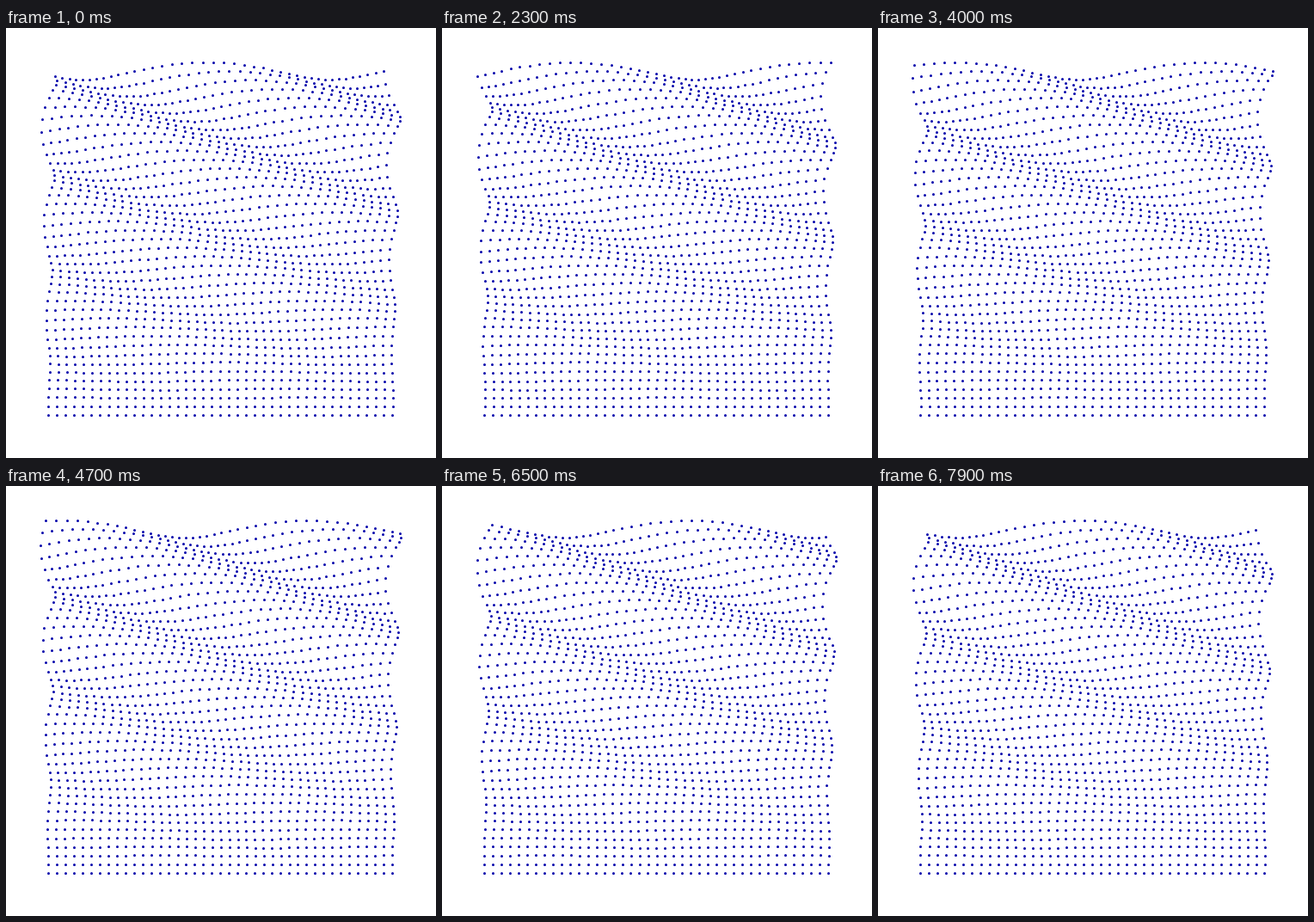
Recreate the animation shown at these times as an HTML page with a canvas. Size 500x500 px, loop 8 s.

```html
<!DOCTYPE html>
<html lang="en">
<head>
<meta charset="utf-8">
<title>Water wave particles</title>
<style>
  html, body { margin: 0; width: 100%; height: 100%; overflow: hidden; background: #fff; }
  canvas { display: block; width: 500px; height: 500px; }
</style>
</head>
<body>
<canvas id="stage" width="500" height="500"></canvas>
<script>
const ctx = document.getElementById('stage').getContext('2d');

const LOOP = 8000, STEP = 100;
const FIRST = 50, LAST = 450, GAP = 10;
const KX = 0.0218, KY = 0.0566;   // wave numbers, radians per pixel
const PHASE = 0.355;              // phase at the middle of the top row
const MAX_RADIUS = 10;
const SHIFT_X = -0.1, SHIFT_Y = 0.35;   // grid offset before snapping to pixels

// Each particle circles its rest point; the circles shrink to nothing at the bottom.
function draw(time) {
  const turn = 2 * Math.PI * time / LOOP;
  ctx.fillStyle = '#fff';
  ctx.fillRect(0, 0, 500, 500);
  ctx.fillStyle = '#0000aa';
  ctx.beginPath();
  for (let y = FIRST; y <= LAST; y += GAP) {
    const radius = MAX_RADIUS * (LAST - y) / (LAST - FIRST);
    for (let x = FIRST; x <= LAST; x += GAP) {
      const phase = KX * (x - 250) - KY * (y - FIRST) + PHASE + turn;
      dot(x + radius * Math.sin(phase), y - radius * Math.cos(phase));
    }
  }
  ctx.fill();
}

// Dots sit on whole pixels.
function dot(x, y) {
  const cx = Math.floor(x + SHIFT_X) + 0.5, cy = Math.floor(y + SHIFT_Y) + 0.5;
  ctx.moveTo(cx + 1.5, cy);
  ctx.arc(cx, cy, 1.5, 0, 2 * Math.PI);
}

let start = null, shown = -1;
function tick(now) {
  if (start === null) start = now;
  const time = Math.floor((now - start) % LOOP / STEP) * STEP;
  if (time !== shown) draw(shown = time);
  requestAnimationFrame(tick);
}
draw(0);
requestAnimationFrame(tick);
</script>
</body>
</html>
```
